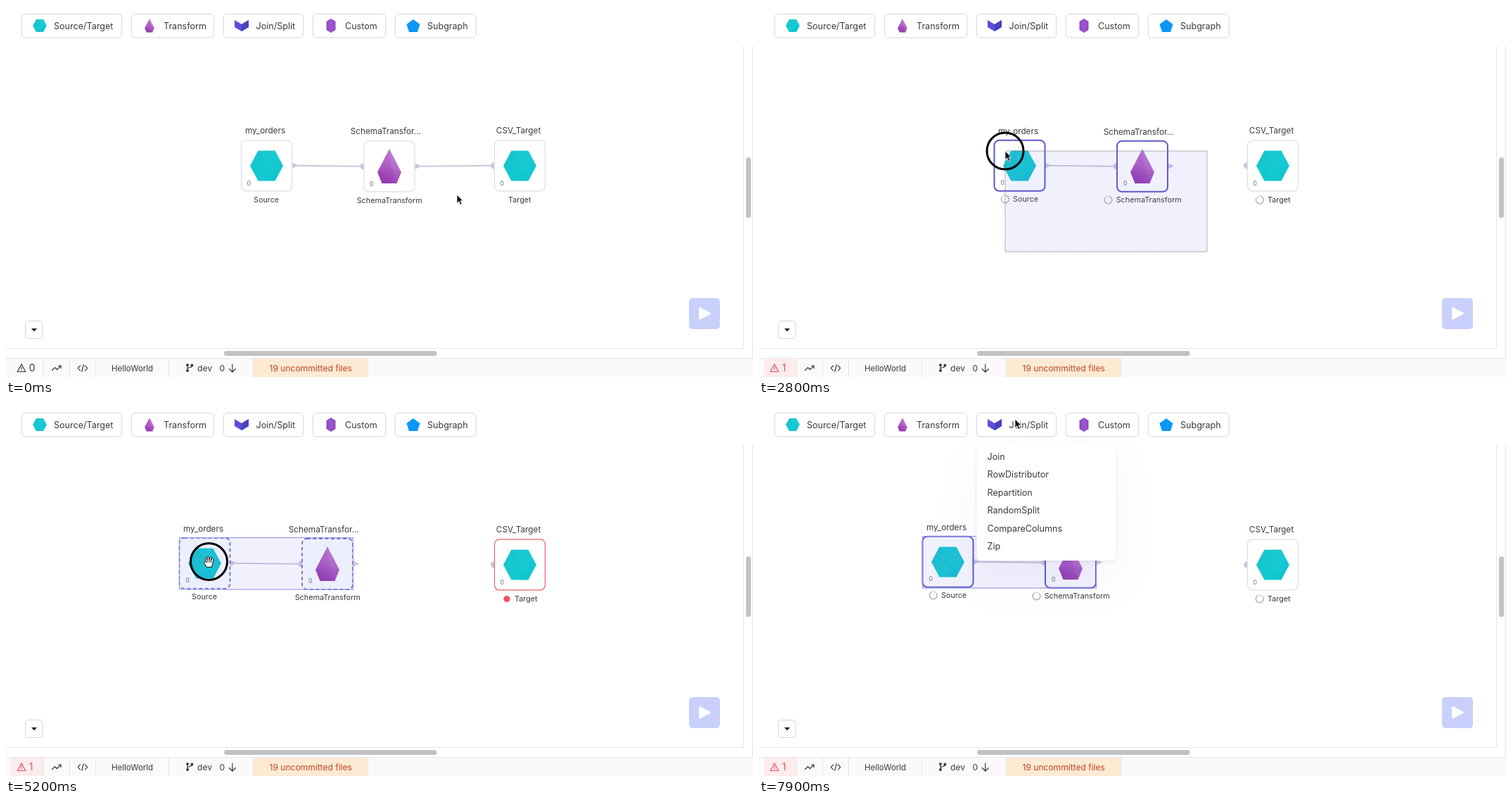
An HTML page that plays this animation: 1062 by 527 pixels, repeating every 8000 ms.

```html
<!DOCTYPE html>
<html lang="en">
<head>
<meta charset="utf-8">
<title>Pipeline editor</title>
<style>
  html, body { margin: 0; width: 100%; height: 100%; overflow: hidden; background: #fff; }
  svg { display: block; width: 1062px; height: 527px; font-family: Inter, "Open Sans", sans-serif; }
  text { fill: #3a3a3f; white-space: pre; }
  .button { fill: #fff; stroke: #d6d6dc; }
  .tool, .menu text { font-size: 12.55px; }
  .name { font-size: 11.75px; }
  .kind { font-size: 10.8px; }
  .count { font-size: 8.6px; fill: #6b6b72; }
  .status { font-size: 12.05px; }
  .port { fill: #cbc8db; }
  .edge { stroke: #cbc8db; stroke-width: 2; }
  .icon { fill: none; stroke: #3a3a3f; stroke-width: 1.2; stroke-linecap: round; stroke-linejoin: round; }
  .rule { stroke: #e6e6ea; }
  .thumb { fill: #c2c2c4; }
  .menu { filter: drop-shadow(0 1px 2px rgba(40, 40, 80, .1)) drop-shadow(0 28px 28px rgba(70, 70, 150, .05)); }
</style>
</head>
<body>
<svg id="stage" viewBox="0 0 1062 527"></svg>
<script>
const LOOP = 8000, STEP = 100;
const GRAB = { from: 4200, to: 6800, x: 376.5, y: 224.5 };
const MARQUEE = { from: 2000, to: 2900, x: 637, y: 349 };

// Rows are [time, x, y].
const POINTER = [
  [0, 641, 268], [500, 642, 229], [1100, 642, 229], [1700, 637, 349], [2000, 637, 349],
  [2100, 585, 323], [2200, 566.5, 300.5], [2700, 350, 206], [3000, 350, 206],
  [3700, 409.5, 235.5], [4100, 376.5, 224.5], [4200, 376.5, 224.5]
];
const LEAVE = [[6800, 274.5, 220.5], [7000, 284, 190], [7300, 352, 42], [7500, 364, 20]];
const DRAG = [[4200, 0, 0], [4600, -42.5, 0], [5000, -78, -1], [5200, -88, -2], [5800, -97, -3], [6400, -102, -4]];
const PRESSES = [[600, 800], [MARQUEE.from, MARQUEE.to], [GRAB.from, GRAB.to]];

const hexagon = '-23.5,0 -12,-21.5 12,-21.5 23.5,0 12,21.5 -12,21.5';
const crystal = '0,-25 17,8 10.5,24 -10.5,24 -17,8';

const poly = (points, fill) => `<polygon points="${points}" fill="${fill}"/>`;
const line = (x1, y1, x2, y2, cls = 'rule') => `<line class="${cls}" x1="${x1}" y1="${y1}" x2="${x2}" y2="${y2}"/>`;
const rect = (x, y, w, h, r, attrs) => `<rect x="${x}" y="${y}" width="${w}" height="${h}" rx="${r}" ${attrs}/>`;
const text = (x, y, cls, label, attrs = '') => `<text x="${x}" y="${y}" class="${cls}" ${attrs}>${label}</text>`;
const at = (x, y, body, scale = 1) => `<g transform="translate(${x} ${y}) scale(${scale})">${body}</g>`;

const teal = poly(hexagon, 'url(#teal)') + poly('-23.5,0 -12,-21.5 0,-6 -12,21.5', 'rgba(0,90,130,.03)');
const purple = poly(crystal, 'url(#purple)') +
  poly('0,-25 17,8 3,3', 'rgba(255,255,255,.07)') + poly('-17,8 3,3 10.5,24 -10.5,24', 'rgba(110,0,130,.06)');
const chevron = poly('-10,-8 0,-2 10,-8 10,2 0,8 -10,2', '#5a4fd8') + poly('0,-2 10,-8 10,2 0,8', '#4b40c0');
const prism = poly('0,-10 6.5,-6 6.5,6 0,10 -6.5,6 -6.5,-6', '#9249c6') + poly('0,-10 3.5,-5 3.5,6 0,10 -3,5 -3,-5', '#9c53ce');
const pentagon = poly('0,-9 9.5,-2 6,9 -6,9 -9.5,-2', '#0b97f6');

const tools = [
  [22, 143, 'Source/Target', 68, at(48, 28, teal, .42)],
  [178, 118, 'Transform', 224, at(204, 28, purple, .4)],
  [309, 114, 'Join/Split', 355.5, at(335, 28, chevron)],
  [436, 104, 'Custom', 482, at(462, 28, prism)],
  [553, 115.5, 'Subgraph', 599, at(579, 28, pentagon)]
];
const nodes = [
  { id: 'src', x: 334.5, y: 190.8, name: 'my_orders', nameX: 340, kind: 'Source', kindX: 352, art: teal, output: true },
  { id: 'mid', x: 509, y: 191.8, name: 'SchemaTransfor...', nameX: 489.8, kind: 'SchemaTransform', kindX: 498.7, art: purple, input: true, output: true },
  { id: 'out', x: 694.5, y: 190.8, name: 'CSV_Target', nameX: 696.8, kind: 'Target', kindX: 714, art: teal, input: true }
];
const options = ['Join', 'RowDistributor', 'Repartition', 'RandomSplit', 'CompareColumns', 'Zip'];

const drawNode = n => `<g id="${n.id}">
  ${n.input ? `<circle class="port" cx="${n.x - 1}" cy="${n.y + 36}" r="4.5"/>` : ''}
  ${n.output ? `<path class="port" d="M${n.x + 72} ${n.y + 31.5}l9.5 4.3l-9.5 4.3z"/>` : ''}
  ${rect(n.x, n.y, 72, 72, 7, 'class="card"')}
  ${at(n.x + 36, n.y + 36.2, n.art)}
  <g class="top">${text(n.nameX, n.y - 9.8, 'name', n.name)}</g>
  <g class="zero">${text(n.x + 8, n.y + 63.7, 'count', '0')}</g>
  <g class="bottom">${text(n.kindX, n.y + 88.2, 'kind', n.kind)}</g>
  <g class="spin"><circle r="5.4" fill="none" stroke="#a9a9ae" stroke-width="1.3"/>
    <path class="arc" d="M0-5.4A5.4 5.4 0 0 1 5.4 0" fill="none" stroke="#e2e2e6" stroke-width="1.5"/></g>
  <circle class="dot" cx="${n.kindX - 2}" cy="${n.y + 84.7}" r="4.6" fill="#ec535f"/>
</g>`;

const statusBar = rect(0, 500, 1062, 27, 0, 'fill="#fafafb"') + line(0, 500.5, 1062, 500.5) +
  rect(7, 501, 46, 26, 0, 'id="alert" fill="#fdecee"') +
  rect(351, 501, 163.5, 26, 0, 'id="badge" fill="#fdead3"') +
  [53.5, 90.5, 127.5, 231.5, 351.5, 514.5].map(x => line(x, 501, x, 527)).join('') +
  `<path id="warnIcon" class="icon" d="M22 508.8L27.8 519.5H16.2zM22 512.8v3M22 517.6v.1"/>` +
  text(32.8, 519.3, 'warn', '0', 'id="warn" font-size="14"') +
  `<path class="icon" d="M65.5 517.5l4-4l3 3l5.5-5.5M74.5 511H78v3.5"/>
   <path class="icon" d="M105.5 511l-3.2 3.4l3.2 3.4M112.5 511l3.2 3.4l-3.2 3.4M110.2 509.5l-2.4 9.8"/>` +
  text(150, 519, 'status', 'HelloWorld', 'id="project" style="font-size:11.5px"') +
  `<g id="git"><path class="icon" d="M258 511.5v5M264 511.5c0 3-6 1-6 4.2"/>
   <circle cx="258" cy="510" r="1.9" fill="#36363b"/><circle cx="258" cy="518" r="1.9" fill="#36363b"/>
   <circle cx="264.4" cy="510.5" r="1.9" fill="#36363b"/>
   <path class="icon" d="M321.8 508.8v11M317.3 515.5l4.5 4.5l4.5-4.5"/>` +
  text(272, 519, 'status', 'dev') + text(303.5, 519, 'status', '0') + '</g>' +
  text(374.5, 519, 'status', '19 uncommitted files', 'id="files"');

document.getElementById('stage').innerHTML = `
<defs>
  <linearGradient id="teal" x1="0" y1="0" x2="1" y2="1"><stop stop-color="#18c6cf"/><stop offset=".55" stop-color="#15cbd3"/><stop offset="1" stop-color="#0fc0cc"/></linearGradient>
  <linearGradient id="purple" x1=".7" y1="0" x2=".3" y2="1"><stop stop-color="#c27ad2"/><stop offset=".55" stop-color="#ad5cc2"/><stop offset="1" stop-color="#983cb0"/></linearGradient>
</defs>
<rect width="1062" height="527" fill="#fff"/>
${line(1048.5, 57, 1048.5, 487)}${line(0, 486.5, 1049, 486.5)}${line(1061.5, 57, 1061.5, 500)}
${rect(1052, 215, 7, 86, 3.5, 'class="thumb"')}${rect(310, 490, 302.5, 7, 3.5, 'class="thumb"')}
<g id="link">${line(585, 227.7, 693, 226.7, 'edge')}</g>
${drawNode(nodes[2])}
<g id="group">
  ${line(411, 226.7, 507, 227.7, 'edge')}${drawNode(nodes[0])}${drawNode(nodes[1])}
  ${rect(334.5, 190.5, 247, 73.5, 0, 'id="bounds" fill="rgba(105,105,230,.09)" stroke="#918be0"')}
</g>
${rect(0, 0, 0, 0, 0, 'id="marquee" fill="rgba(105,105,230,.09)" stroke="#66666f" stroke-dasharray="1 1"')}
${rect(971, 415, 44, 44, 5, 'fill="#c9d0fb"')}
<path d="M986 429v15.5l15-7.75z" fill="#fff" stroke="#fff" stroke-width="2" stroke-linejoin="round"/>
${rect(27.5, 447.5, 24.5, 25, 4, 'class="button"')}${poly('36,458 44,458 40,462.5', '#242428')}
${tools.map(([x, w, label, tx, art]) => rect(x + .3, 11.4, w - .6, 33.6, 5, 'class="button"') + art + text(tx, 32.5, 'tool', label)).join('')}
<g id="menu" class="menu">${rect(309.5, 54, 198, 167, 6, 'fill="#fff"')}
${options.map((label, i) => text(324.5, 78 + 25.4 * i, '', label)).join('')}</g>
${statusBar}
<circle id="ring" fill="none" stroke="#000" stroke-width="3"/>
<path id="arrow" d="M0 0v12.3l2.800-2.600l2.200 4.800l2.200-1l-2.200-4.700h3.700z" fill="#111" stroke="#fff" stroke-width=".8"/>
<g id="hand" stroke="#111" stroke-linecap="round" stroke-linejoin="round">
  <path d="M-3.5 7.5L-6.800 1.800C-7.500 0-5.500-.8-4.500.5L-3.700 1.500L-5.300-3.600C-5.600-5.600-3.800-6-3.200-4.600L-2.200-2L-2.400-6.200C-2.300-7.900-.3-7.900 0-6.200L.4-2.300L1.300-6C1.900-7.400 3.600-7 3.400-5.300L3-1.700L4.300-4.200C5-5.400 6.700-4.700 6.300-3.200L5 3.500L3.800 7.500z" fill="#fff"/>
  <path d="M-1.800-2v3M.7-2v3M3-1.500v2.500" fill="none" stroke-width=".9"/>
</g>`;

const $ = id => document.getElementById(id);
const show = (el, on) => { el.style.display = on ? '' : 'none'; };
const move = (el, x, y) => el.setAttribute('transform', `translate(${x} ${y})`);
const set = (el, attrs) => Object.entries(attrs).forEach(([k, v]) => el.setAttribute(k, v));
const within = (t, a, b) => t >= a && t < b;

function track(rows, t) {
  const i = rows.findIndex(row => row[0] > t);
  if (i === 0) return rows[0].slice(1);
  if (i < 0) return rows[rows.length - 1].slice(1);
  const [a, b] = [rows[i - 1], rows[i]];
  const k = (t - a[0]) / (b[0] - a[0]);
  return [a[1] + (b[1] - a[1]) * k, a[2] + (b[2] - a[2]) * k];
}

function pointer(t) {
  if (t < GRAB.from) return track(POINTER, t);
  if (t >= GRAB.to) return track(LEAVE, t);
  const [dx, dy] = track(DRAG, t);
  return [GRAB.x + dx, GRAB.y + dy];
}

function paintNode(n, { selected, dragging, error, busy, t }) {
  const g = $(n.id), part = cls => g.querySelector('.' + cls);
  set(part('card'), {
    fill: dragging ? '#f9fdff' : '#fff',
    stroke: error ? '#e2636e' : dragging ? '#6b65d0' : selected ? '#5f59cb' : '#dedee5',
    'stroke-width': dragging ? 1.7 : selected ? 2 : 1.2,
    'stroke-dasharray': dragging ? '5 3.5' : 'none'
  });
  const shift = selected ? 1 : 0;
  move(part('top'), 0, shift);
  move(part('zero'), shift, -shift);
  move(part('bottom'), busy || error ? 9 : 0, -shift);
  move(part('spin'), n.kindX - 2.2, n.y + 84.7 - shift);
  part('arc').setAttribute('transform', `rotate(${t * .36})`);
  show(part('spin'), busy);
  show(part('dot'), error);
}

function paint(t) {
  const [x, y] = pointer(t);
  const [dx, dy] = track(DRAG, t);
  const dragging = within(t, GRAB.from, GRAB.to);
  const selecting = within(t, MARQUEE.from, MARQUEE.to);
  const [mx, my] = pointer(t - STEP);
  const error = within(t, 5000, GRAB.to);
  const checking = within(t, 1800, 5000) || t >= GRAB.to;

  nodes.forEach(n => {
    const movable = n.id !== 'out';
    const touched = selecting && mx < n.x + 72 && my < n.y + 72;
    paintNode(n, {
      t,
      selected: movable && (touched || t >= MARQUEE.to),
      dragging: movable && dragging,
      error: !movable && error,
      busy: checking
    });
  });
  move($('group'), dx, dy);
  show($('link'), t < 1000);
  show($('bounds'), t >= MARQUEE.to);
  show($('marquee'), selecting);
  set($('marquee'), {
    x: Math.min(mx, MARQUEE.x), y: Math.min(my, MARQUEE.y),
    width: Math.abs(MARQUEE.x - mx), height: Math.abs(MARQUEE.y - my)
  });
  show($('menu'), t >= 7500);

  const warned = t >= 1900, saving = within(t, 1200, 2800);
  const warnColor = warned ? '#e4525e' : '#3a3a3f';
  show($('alert'), warned);
  $('warn').textContent = warned ? '1' : '0';
  $('warn').style.fill = $('warnIcon').style.stroke = warnColor;
  $('project').style.fill = saving ? '#17171a' : '#3a3a3f';
  show($('badge'), !saving);
  $('git').style.opacity = saving ? .35 : 1;
  $('files').style.fill = saving ? '#d9c7c0' : '#c04527';

  const press = PRESSES.find(([a, b]) => within(t, a, b));
  show($('ring'), press);
  if (press) set($('ring'), { cx: x, cy: y, r: Math.min(26, (t - press[0]) * .09) });
  const grabbing = within(t, 3000, GRAB.to);
  show($('hand'), grabbing);
  show($('arrow'), !grabbing);
  move($(grabbing ? 'hand' : 'arrow'), x, y);
}

const start = performance.now();
function tick() {
  const t = (performance.now() - start) % LOOP;
  paint(Math.floor(t / STEP) * STEP);
  requestAnimationFrame(tick);
}
tick();
</script>
</body>
</html>
```
